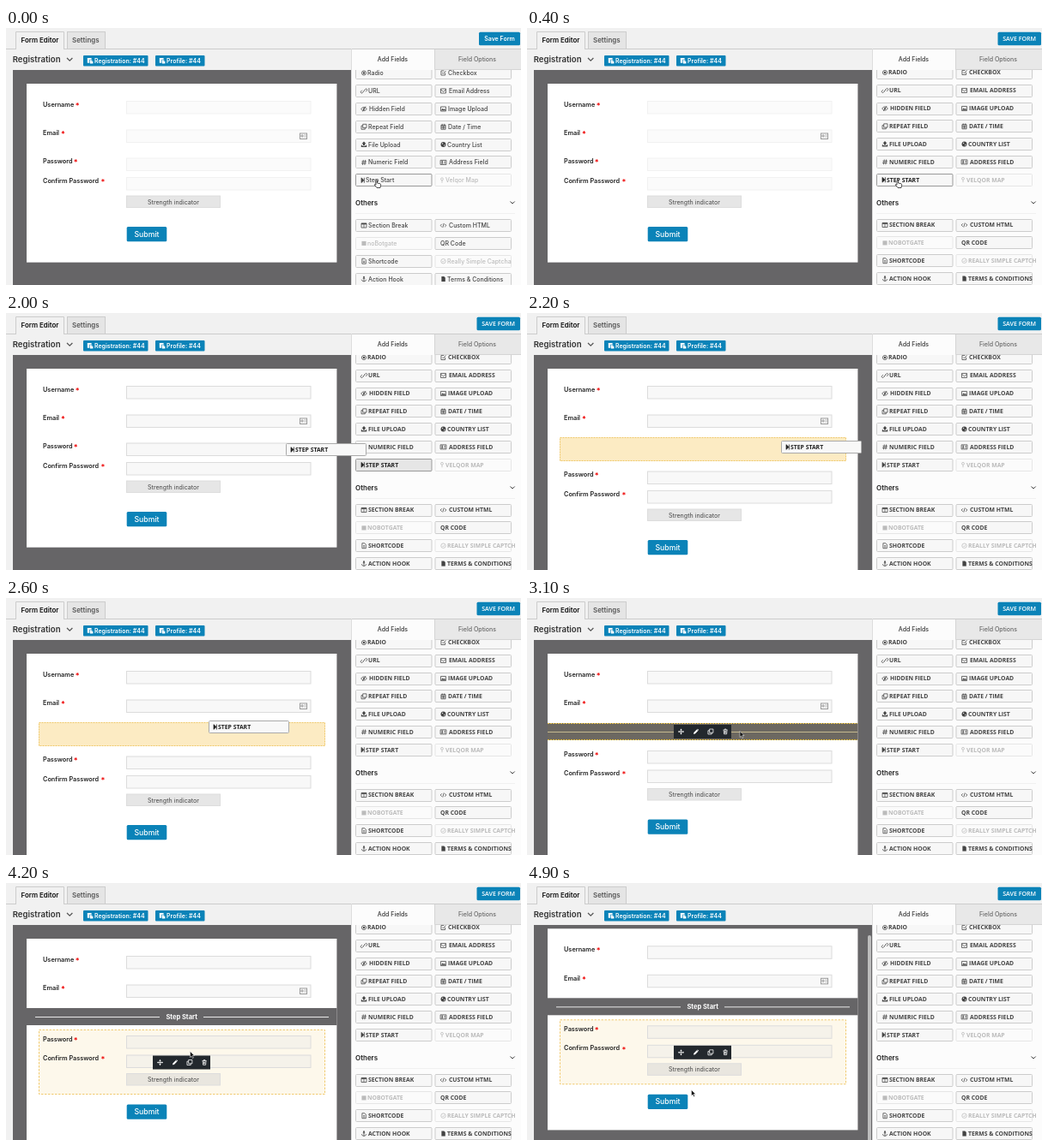
An HTML page for the animation above (5000 ms loop, 600 by 300 pixels).

```html
<!DOCTYPE html>
<html>
<head>
<meta charset="utf-8">
<style>
html, body { margin: 0; width: 100%; height: 100%; overflow: hidden; background: #f1f1f1; }
svg { display: block; width: 600px; height: 300px; font-family: Inter, "Liberation Sans", sans-serif; }
.caps { font-family: "Open Sans", sans-serif; }
</style>
</head>
<body>
<svg id="stage" viewBox="0 0 600 300"></svg>
<script>
const LOOP = 5000, STEP = 100;
const BLUE = '#0b83b8', GREY = '#666567', INK = '#444';

// Icons are drawn around their centre, about 8 units wide.
const line = d => `<path d="${d}" fill="none" stroke="currentColor" stroke-width=".9"/>`;
const solid = d => `<path d="${d}" fill="currentColor"/>`;
const box = 'M-3.5-3h7v6h-7z';
const disc = r => `M${-r} 0a${r} ${r} 0 1 0 ${2 * r} 0a${r} ${r} 0 1 0 ${-2 * r} 0z`;
const page = 'M-2.5-3.5h3.5l1.7 1.7v5.3h-5.2z';
const ICONS = {
  radio: line(disc(3)) + solid(disc(1.4)),
  check: line('M2.5 0v3h-5.5v-6h4M-1.5-.5l1.5 1.5 3.5-4'),
  link: line('M-.5 1l-1.5 1.5a1.4 1.4 0 0 1-2-2l1.5-1.5M.5-1l1.5-1.5a1.4 1.4 0 0 1 2 2l-1.5 1.5M-1.3 1.3l2.6-2.6'),
  mail: line(box + 'M-3.5-2l3.5 3 3.5-3'),
  hidden: line('M-4 0q4-5 8 0q-4 5-8 0M-2 3.5l4.5-7') + solid(disc(1.2)),
  image: line(box) + solid('M-3 2.2l2-3 1.3 1.6 1.2-1 1.8 2.4z'),
  copy: line('M-1.5-3.5h5v5h-5zM-1.5-1.5h-2v5h5v-2'),
  paste: solid('M-4-4h6v2h-3v5h-3zM-.2-1.2h2.400v2h2v3.200h-4.400zM2.900-1.200l1.300 1.300h-1.300z'),
  date: line('M-3-2.5h6v6h-6zM-3-.8h6M-1.5-4v2M1.5-4v2M0-1v4M-3 1.3h6'),
  upload: solid('M0-4l3 3.2h-1.8v2h-2.4v-2h-1.8zM-3.8 1h1.6v1.2h4.4v-1.2h1.6v2.5h-7.6z'),
  globe: solid(disc(3.5)) + '<path d="M-2-2.5l2 1-1.5 1.5zM1 0l1.5 1-1.5 1.5z" fill="#f7f7f7"/>',
  hash: line('M-.8-3.5l-1 7M2-3.5l-1 7M-3-1.2h6.5M-3.5 1.3h6.5'),
  card: line('M-4-3h8v6h-8zM1-1h2M1 1h2') + solid('M-2.8 2q0-2 1.3-2t1.3 2zM-2.5-1.2a1 1 0 1 0 2 0a1 1 0 1 0-2 0'),
  step: solid('M-2.2-3.5h1.2v7h-1.2zM-1 0l0-3.3 3 3.3-3 3.3zM1.6-3.5h1v7h-1z'),
  pin: line('M0 3.5v-3.3M-1.7-1.6a1.7 1.7 0 1 0 3.4 0a1.7 1.7 0 1 0-3.4 0'),
  columns: line(box + 'M0-3v6') + solid('M-3.5-3h7v1.6h-7z'),
  code: line('M-2-2l-2 2 2 2M2-2l2 2-2 2M.8-3l-1.6 6'),
  square: solid('M-3-3h6v6h-6z'),
  file: line(page + 'M-1 0h2.2M-1 1.6h2.2'),
  tick: line(disc(3.2) + 'M-1.5 0l1.2 1.2 2-2.3'),
  hook: line('M0-2v5.3M-3.2 .8q.7 2.6 3.2 2.6t3.2-2.6M-1.5-.8h3') + solid('M-1.1-2.7a1.1 1.1 0 1 0 2.2 0a1.1 1.1 0 1 0-2.2 0'),
  text: solid(page),
  move: line('M-3.5 0h7M0-3.5v7') + solid('M-4 0l1.8-1.5v3zM4 0l-1.8-1.5v3zM0-4l-1.5 1.8h3zM0 4l-1.5-1.8h3z'),
  pen: solid('M-3.3 3.3l.6-2.2 4-4 1.7 1.7-4 4zM1.8-3.3l.7-.5 1.5 1.5-.6.7z'),
  trash: line('M-3-2.3h6M-1-2.5v-1h2v1M-2.2-2l.4 5.3h3.6l.4-5.3M-.7-1v3M.7-1v3')
};

// Each row: centre, then icon, label and label x for both columns; "-" marks a disabled entry.
const FIELDS = [
  [52, 'radio', 'Radio', 421, 'check', 'Checkbox', 515],
  [73, 'link', 'URL', 422, 'mail', 'Email Address', 516],
  [94, 'hidden', 'Hidden Field', 423, 'image', 'Image Upload', 515],
  [114.8, 'copy', 'Repeat Field', 422, 'date', 'Date / Time', 515],
  [135.5, 'upload', 'File Upload', 422, 'globe', 'Country List', 514],
  [156.4, 'hash', 'Numeric Field', 422, 'card', 'Address Field', 516],
  [177.2, 'step', 'Step Start', 419, 'pin', '-Velqor Map', 512],
  [230, 'columns', 'Section Break', 422, 'code', 'Custom HTML', 516],
  [250.9, 'square', '-noBotgate', 421, '', 'QR Code', 506],
  [271.7, 'file', 'Shortcode', 422, 'tick', '-Really Simple Captcha', 514],
  [292.5, 'hook', 'Action Hook', 422, 'text', 'Terms & Conditions', 514]
];

const rect = (x, y, w, h, fill, more = '') =>
  `<rect x="${x}" y="${y}" width="${w}" height="${h}" fill="${fill}" ${more}/>`;
const framed = (x, y, w, h, fill, edge, more = '') =>
  rect(x + .5, y + .5, w - 1, h - 1, fill, `stroke="${edge}" ${more}`);
const text = (s, x, y, size, fill = '#333', weight = 600, more = '') =>
  `<text x="${x}" y="${y + size * .36}" font-size="${size}" fill="${fill}" font-weight="${weight}" ${more}>${s.replace('&', '&amp;')}</text>`;
const capsText = (s, x, y, fill) => text(s.toUpperCase(), x, y, 6.85, fill, 700, 'class="caps"');
const icon = (name, x, y, color = INK, scale = .85) =>
  `<g transform="translate(${x} ${y}) scale(${scale})" color="${color}">${ICONS[name] || ''}</g>`;
const stroke = (d, color, width = 1, more = '') =>
  `<path d="${d}" fill="none" stroke="${color}" stroke-width="${width}" ${more}/>`;
const MID = 'text-anchor="middle"';

// Linear position along keys of [time, ...values].
function along(t, keys) {
  if (t <= keys[0][0]) return keys[0].slice(1);
  for (let i = 1; i < keys.length; i++) {
    const [a, ...from] = keys[i - 1], [b, ...to] = keys[i];
    if (t <= b) return from.map((v, k) => v + (to[k] - v) * (t - a) / (b - a));
  }
  return keys[keys.length - 1].slice(1);
}

function header(caps) {
  const badge = (x, w, s) => rect(x, 32, w, 12.5, BLUE, 'rx="1"') +
    icon('paste', x + 8, 38.3, '#fff', .8) + text(s, x + 13, 38.2, 7, '#fff');
  const saveX = caps ? 548.5 : 551;
  return stroke('M0 24.5H600', '#ccc') +
    stroke('M11.5 24.5V4.5H67.5V24.5', '#ccc') + rect(12, 24, 55, 1, '#f1f1f1') +
    framed(71, 4, 45, 21, '#e5e5e5', '#ccc') +
    text('Form Editor', 17.5, 14, 7.9, '#111') + text('Settings', 77, 14, 7.9, '#555') +
    rect(saveX, 4.7, 599 - saveX, 15.6, BLUE, 'rx="1.5"') +
    (caps ? text('SAVE FORM', 573.7, 12.5, 7.1, '#fff', 600, MID + ' class="caps"')
          : text('Save Form', 575, 12.5, 7, '#fff', 600, MID)) +
    text('Registration', 7.7, 36.2, 9.6, '#333') + stroke('M71 35l3.2 3.2 3.2-3.2', '#555', 1.2) +
    badge(90, 75.5, 'Registration: #44') + badge(174, 57.5, 'Profile: #44');
}

function panel(t, caps) {
  const entry = (x, y, iconX, name, label, tx) => {
    const off = label[0] === '-', hot = name === 'step' && t < 2200;
    const ink = off ? '#bbb' : hot && caps ? '#222' : INK, shown = label.replace('-', '');
    return framed(x, Math.round(y - 7.5), 89.5, 15, hot && t >= 600 ? '#e6e6e6' : off ? '#fbfbfb' : '#f7f7f7',
      hot ? '#999' : off ? '#e6e6e6' : '#ccc', 'rx="1"') +
      icon(name, iconX, y, ink) +
      (caps ? capsText(shown, tx, y, ink) : text(shown, tx, y, 7, ink, 500));
  };
  const drop = caps ? 0 : .5;
  return rect(402, 25, 198, 275, '#fcfcfc') + rect(499, 25, 101, 24, '#e8e8e8') +
    stroke('M402.5 24V300', '#ddd') + stroke('M499.5 25V48.5H600', '#d5d5d5') +
    text('Add Fields', 450.5, 36.3, 7, '#333', 500, MID) + text('Field Options', 549, 36.3, 7, '#666', 500, MID) +
    '<g clip-path="url(#list)">' + FIELDS.map(([y, a, b, c, d, e, f]) =>
      entry(407, y + drop, a === 'step' ? 415.5 : 417, a, b, c) +
      entry(499.5, y + drop, d === 'pin' ? 508 : 509.5, d, e, f)).join('') + '</g>' +
    text('Others', 407, 203.7, 8, '#222') + stroke('M587.5 202.5l2.6 2.6 2.6-2.6', '#444') +
    stroke('M407 216.5H593', '#f0f0f0');
}

function tools(y) {
  return rect(171, y, 67, 16, '#23282d') +
    ['move', 'pen', 'copy', 'trash'].map((n, i) => icon(n, 179.5 + 17.2 * i, y + 8, '#fff')).join('');
}

function bar(hover) {
  if (hover) return rect(24, 146, 361.4, 20, '#6c6861') + stroke('M24 156.5H385', '#c5b98f') +
    stroke('M24 146.5H385M24 165.5H385', '#e3bd45', 1, 'stroke-dasharray="2 1"') + tools(148);
  return rect(24, 146, 361.4, 20, GREY) + stroke('M34 156.5H179M230 156.5H376', '#e8e8e8') +
    text('Step Start', 204.7, 156, 7.5, '#fff', 700, MID);
}

function form(t) {
  const dropped = t >= 3000, target = t >= 2200 && !dropped, group = t >= 4100;
  const shift = dropped ? 26.5 : target ? 33 : 0;
  const [scroll] = along(t, [[4400, 0], [4900, 11.7]]);
  const faint = t < 1600;
  const fill = faint ? '#fbfbfb' : '#f8f8f8', edge = faint ? '#f1f1f1' : '#dcdcdc';
  const row = (label, star, ly, iy, tint) => text(label, 43, ly, 7.3, '#222') +
    text('*', star, ly + 1.5, 9, '#e00') + framed(140, iy, 215.5, 15.5, tint || fill, edge);
  const tint = group ? '#f5f2ea' : '';
  return rect(8, 49, 394, 251, GREY) + `<g clip-path="url(#area)"><g transform="translate(0 ${-scroll})">` +
    rect(24, 65, 361.4, 208.6 + shift, '#fff') +
    row('Username', 80.8, 89, 85) + row('Email', 64, 122.7, 118.5) +
    framed(342, 122.5, 9, 7.5, '#fff', '#999') + stroke('M344 125h2v2h-2zM347.5 125h2M347.5 127h2', '#888', .8) +
    (target ? framed(38, 145, 334, 28, '#fcebc3', '#efc766', 'stroke-dasharray="2 1"') : '') +
    (dropped ? bar(!group) : '') +
    (group ? framed(38, 171, 334, 76, '#fdf8eb', '#f1cb70', 'stroke-dasharray="2.5 1.5"') : '') +
    `<g transform="translate(0 ${shift})">` +
    row('Password', 78.8, 155.7, 151.5, tint) + row('Confirm Password', 110.5, 178, 174, tint) +
    framed(140, 195.5, 110, 14.5, group ? '#e9e6df' : '#e6e6e6', '#ddd') +
    text('Strength indicator', 195, 203, 7.1, '#444', 400, MID) +
    rect(140.7, 232, 46.6, 17.3, BLUE, 'rx="1.5"') + text('Submit', 164, 240.5, 8.7, '#fff', 500, MID) + '</g>' +
    (group ? tools(201.5) : '') + '</g></g>' +
    (scroll ? rect(397, 61, 4, 242, '#bdbdbd', 'rx="2"') : '');
}

function pointer(t) {
  if (t < 1600) return `<path transform="translate(431 177.5)" fill="#fff" stroke="#222" stroke-width=".8" stroke-linejoin="round"
    d="M0 .5q.8-1 1.5 0v3l3.5.8q.8.3.6 1.5l-.6 3.2h-4l-2.8-3.6q.4-1.2 1.8 0z"/>`;
  if (t < 3000) {
    const [x, y] = along(t, [[1500, 407, 170], [2000, 326, 152], [2600, 236, 143], [2800, 223, 148]]).map(Math.round);
    return framed(x, y, 94, 15, '#f8f8f8', '#aaa', 'rx="1"') + icon('step', x + 7.5, y + 7.5, '#222') +
      capsText('Step Start', x + 11, y + 7.5, '#222');
  }
  const [x, y] = along(t, [[3900, 248, 155.5], [4200, 214.5, 196.5], [4400, 214.5, 196.5], [4900, 191.5, 241.5]]);
  return `<path transform="translate(${x} ${y})" d="M0 0v7l1.6-1.5 1.2 2.6 1.2-.6-1.2-2.5h2.2z" fill="#111" stroke="#fff" stroke-width=".5"/>`;
}

const DEFS = '<defs><clipPath id="list"><path d="M403 49h190v251H403z"/></clipPath>' +
  '<clipPath id="area"><path d="M8 49h394v251H8z"/></clipPath></defs>';
const stage = document.getElementById('stage');
let start, shown = -1;

function tick(now) {
  start ??= now;
  const t = Math.floor((now - start) % LOOP / STEP) * STEP;
  if (t !== shown) {
    const caps = t >= 200;
    stage.innerHTML = DEFS + header(caps) + form(t) + panel(t, caps) + pointer(t);
    shown = t;
  }
  requestAnimationFrame(tick);
}
requestAnimationFrame(tick);
</script>
</body>
</html>
```
